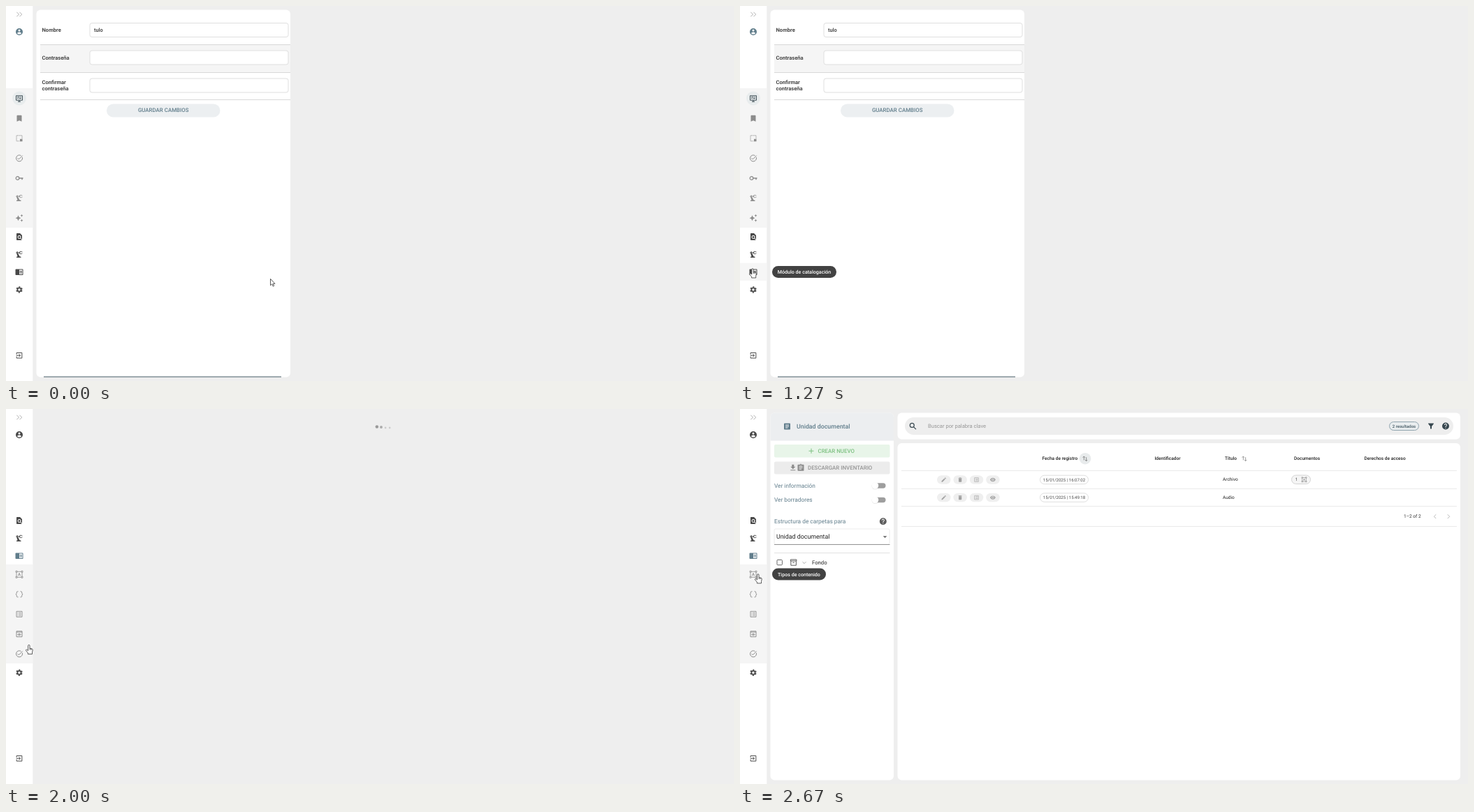
These frames come from a looping animation (1042x538 px, 5.2 s). An HTML page:

```html
<!DOCTYPE html>
<html lang="es">
<head>
<meta charset="utf-8">
<title>Panel</title>
<style>
html, body { margin: 0; width: 100%; height: 100%; overflow: hidden; background: #eee; }
svg { display: block; width: 100vw; height: 100vh; font-family: Roboto, sans-serif; text-rendering: geometricPrecision; }
</style>
</head>
<body>
<svg id="stage" viewBox="0 0 1042 538"></svg>
<script>
const DARK = '#484848', TEAL = '#607d8b', NAVY = '#37474f', GREY = '#8c8c8c';
const LOOP = 5200, TICK = 200 / 3;

// Icon parts on a 24 unit grid
const fill = d => `<path fill="currentColor" fill-rule="evenodd" d="${d}"/>`;
const line = (d, w = 2) => `<path fill="none" stroke="currentColor" stroke-width="${w}" d="${d}"/>`;
const ring = (x, y, r, w, extra = '') =>
  `<circle cx="${x}" cy="${y}" r="${r}" fill="none" stroke="currentColor" stroke-width="${w}" ${extra}/>`;

const ICONS = {
  user: fill('M12 2a10 10 0 1 0 0 20a10 10 0 1 0 0-20zm0 3a3 3 0 1 1 0 6a3 3 0 1 1 0-6zm0 14.2c-2.5 0-4.7-1.3-6-3.2c0-2 4-3.1 6-3.1s6 1.1 6 3.1c-1.3 1.9-3.5 3.2-6 3.2z'),
  more: line('M4 5l7 7-7 7M13 5l7 7-7 7', 1.7),
  screen: line('M3 4h18v13H3zM8 21h8M12 17v4M6 8h7M15 8h3M6 12h3M11 12h7', 1.9),
  bookmark: fill('M17 3H7c-1.1 0-2 .9-2 2v16l7-3 7 3V5c0-1.1-.9-2-2-2z'),
  select: '<path d="M20 13V4H4v16h9" fill="none" stroke="currentColor" stroke-width="1.6" stroke-dasharray="2.5 1"/>' +
    fill('M14 14h7v7h-7z'),
  task: line('M20.6 9.2A9 9 0 1 1 17 4.5M7 11.6l3.6 3.6L21.3 4.5'),
  key: ring(7, 12, 4.7, 2.4) + line('M11.5 12H23M20 12v4.5', 3),
  arm: fill('M19.9 8.35l-3.6 1.7L14 7.7V6.3l2.3-2.3 3.6 1.7c.9.3 1.5-.9.7-1.4l-4-1.8c-.4-.2-.8-.1-1.1.2L13.8 4.4C13.2 3.6 12 4 12 5v1H8.8A3 3 0 1 0 4.5 9.6L7.1 18H6c-1.1 0-2 .9-2 2v1h13v-1c0-1.1-.9-2-2-2h-1.6L8.4 8.8l.4-.8H12v1c0 1 1.2 1.4 1.8.6l1.7 1.7c.3.3.7.4 1.1.2l4-1.8c.8-.5.2-1.7-.7-1.35zM6 6a1 1 0 1 1 0 2a1 1 0 1 1 0-2z'),
  stars: fill('M19 9l1.25-2.75L23 5l-2.75-1.25L19 1l-1.25 2.75L15 5l2.75 1.25zM11.5 9.5L9 4 6.5 9.5 1 12l5.5 2.5L9 20l2.5-5.5L17 12zM19 15l-1.25 2.75L15 19l2.75 1.25L19 23l1.25-2.75L23 19l-2.75-1.25z'),
  find: fill('M20 19.6V8l-6-6H6c-1.1 0-2 .9-2 2v16c0 1.1.9 2 2 2h12l1.2-.4-4.4-4.4A5 5 0 1 1 16.2 15.8zM12 10a3 3 0 1 0 0 6a3 3 0 1 0 0-6z'),
  book: fill('M13 9.5h7V11h-7zm0 2.5h7v1.5h-7zm0 2.5h7V16h-7zM21 4H3c-1.1 0-2 .9-2 2v13c0 1.1.9 2 2 2h18c1.1 0 2-.9 2-2V6c0-1.1-.9-2-2-2zm0 15h-9V6h9z'),
  gear: ring(12, 12, 5.5, 3.8) + ring(12, 12, 8.4, 2.8, 'pathLength="12" stroke-dasharray="1 1" stroke-dashoffset="-.5"'),
  exit: line('M4 9V4h16v16H4v-5M3 12h12M10.8 7.7L15.1 12l-4.3 4.3'),
  frame: line('M6 4h12M6 20h12M4 6v12M20 6v12M2 2h4v4H2zM18 2h4v4h-4zM2 18h4v4H2zM18 18h4v4h-4zM8.5 16L12 8l3.5 8M10 13.5h4', 1.6),
  braces: line('M9 4H7Q4.5 4 4.5 7V9L2.5 12l2 3v2q0 3 2.5 3h2M15 4h2q2.5 0 2.5 3v2l2 3-2 3v2q0 3-2.5 3h-2'),
  list: line('M4 4h16v16H4zM7 8h2M11 8h6M7 12h2M11 12h6M7 16h2M11 16h6', 1.8),
  preview: line('M4 4h16v16H4zM4 6.5h16') + line('M7 13.5q5-6 10 0q-5 6-10 0z', 1.6) + fill('M10.5 12h3v3h-3z'),
  article: fill('M19 3H5c-1.1 0-2 .9-2 2v14c0 1.1.9 2 2 2h14c1.1 0 2-.9 2-2V5c0-1.1-.9-2-2-2zm-5 14H7v-2h7zm3-4H7v-2h10zm0-4H7V7h10z'),
  clip: fill('M19 3h-4.2a3 3 0 0 0-5.6 0H5c-1.1 0-2 .9-2 2v14c0 1.1.9 2 2 2h14c1.1 0 2-.9 2-2V5c0-1.1-.9-2-2-2zm-7 0a1 1 0 1 1 0 2a1 1 0 1 1 0-2zm2 14H7v-2h7zm3-4H7v-2h10zm0-4H7V7h10z'),
  download: fill('M19 9h-4V3H9v6H5l7 7zM5 18v2h14v-2z'),
  plus: line('M12 5v14M5 12h14'),
  help: fill('M12 2a10 10 0 1 0 0 20a10 10 0 1 0 0-20zm1 17h-2v-2h2zm2.07-7.75l-.9.9C13.45 12.9 13 13.5 13 15h-2v-.5c0-1.1.45-2.1 1.17-2.8l1.24-1.3A2 2 0 1 0 10 9H8a4 4 0 1 1 7.07 2.25z'),
  search: line('M14 14l6 6', 2.3) + ring(9.5, 9.5, 5.5, 2.2),
  filter: fill('M4.25 5.6L10 13v6c0 .55.45 1 1 1h2c.55 0 1-.45 1-1v-6l5.75-7.4c.5-.65 0-1.6-.8-1.6H5c-.8 0-1.25.95-.75 1.6z'),
  sort: line('M8 17V4M4 8l4-4 4 4M16 7v13M12 16l4 4 4-4', 1.7),
  edit: fill('M3 17.25V21h3.75L17.8 9.95 14.05 6.2zM20.7 7c.4-.4.4-1 0-1.4l-2.3-2.3c-.4-.4-1-.4-1.4 0l-1.85 1.8 3.75 3.75z'),
  trash: fill('M6 19c0 1.1.9 2 2 2h8c1.1 0 2-.9 2-2V7H6zM19 4h-3.5l-1-1h-5l-1 1H5v2h14z'),
  eye: fill('M12 4.5C7 4.5 2.7 7.6 1 12c1.7 4.4 6 7.5 11 7.5s9.3-3.1 11-7.5c-1.7-4.4-6-7.5-11-7.5zM12 7a5 5 0 1 1 0 10a5 5 0 1 1 0-10zm0 2a3 3 0 1 0 0 6a3 3 0 1 0 0-6z'),
  box: line('M3.5 4h17v4h-17zM4.5 8v12.5h15V8M9.5 12.5h5'),
  down: line('M5 9l7 7 7-7'),
  left: line('M15 5l-7 7 7 7'),
  right: line('M9 5l7 7-7 7'),
};

const icon = (name, x, y, color, size = 12) =>
  `<g color="${color}" transform="translate(${x} ${y}) scale(${size / 24}) translate(-12 -12)">${ICONS[name]}</g>`;
const rect = (x, y, w, h, color, rx = 0, stroke = 'none') =>
  `<rect x="${x}" y="${y}" width="${w}" height="${h}" rx="${rx}" fill="${color}" stroke="${stroke}"/>`;
const disc = (x, y, r, color, opacity = 1) =>
  `<circle cx="${x}" cy="${y}" r="${r}" fill="${color}" opacity="${opacity}"/>`;
const rule = (x1, x2, y, color = '#e2e2e2') => rect(x1, y, x2 - x1, 1, color);
const text = (s, x, y, size, color, weight = 400, anchor = 'start') =>
  `<text x="${x}" y="${y}" font-size="${size}" fill="${color}" font-weight="${weight}" text-anchor="${anchor}">${s}</text>`;
const group = (id, body) => `<g id="${id}">${body}</g>`;
const column = (names, y, step, color) =>
  names.map((n, i) => icon(n, 19, y + i * step, color)).join('');

function accountPage() {
  const field = y => rect(120, y + .5, 284, 20, '#fff', 3, '#dfdfdf');
  const label = (s, y) => text(s, 51.5, y, 7.6, DARK, 700);
  return rect(43.5, 5.5, 363.5, 527, '#fff', 6) +
    rect(49, 56, 358, 39, '#f5f5f5') +
    [55, 95, 134].map(y => rule(49, 407, y, '#d8d8d8')).join('') +
    [24, 63.5, 103.5].map(field).join('') +
    label('Nombre', 37) + label('Contraseña', 76.7) + label('Confirmar', 112) + label('contraseña', 121.2) +
    text('tulo', 126, 37, 7.4, '#333', 500) +
    rect(144, 140.5, 162.5, 19, '#eceff1', 9.5) +
    text('GUARDAR CAMBIOS', 225.2, 152.2, 7.9, TEAL, 500, 'middle') +
    rule(54, 394, 531.5, '#455a64');
}

function menuBefore() {
  return rect(0, 118, 38, 200, '#f5f5f5') + disc(19, 132.5, 10, '#e8eced') +
    icon('user', 19, 37, TEAL) + icon('screen', 19, 132.7, NAVY) +
    column(['bookmark', 'select', 'task', 'key', 'arm', 'stars'], 161.2, 28.6, GREY);
}

function menuAfter() {
  return rect(0, 223, 38, 142, '#f5f5f5') + icon('user', 19, 37, DARK) +
    column(['frame', 'braces', 'list', 'preview', 'task'], 237.3, 28.5, GREY);
}

// Entries that slide with the opened section
const mainMenu = (y, gearY, bookColor) =>
  column(['find', 'arm'], y, 25.4, DARK) + icon('book', 19, y + 50.5, bookColor) + icon('gear', 19, gearY, DARK, 11.5);

function catalogPage() {
  const toggle = y => rect(193, y - 3.7, 15.5, 7.4, '#9e9e9e', 3.7) +
    disc(193.5, y + .6, 5, '#000', .1) + disc(193.5, y, 4.8, '#fff');
  return rect(43.5, 5.5, 176.5, 527, '#fff', 6) +
    '<path d="M43.5 45.5V11.5a6 6 0 0 1 6-6H214a6 6 0 0 1 6 6V45.5z" fill="#eceef0"/>' +
    icon('article', 67.5, 25, TEAL) + text('Unidad documental', 81, 28.3, 8.8, TEAL, 500) +
    rect(49, 51, 165.5, 18.5, '#e8f5e9', 2) + icon('plus', 102, 60.2, '#7cc080') +
    text('CREAR NUEVO', 111.5, 62.8, 7.9, '#7cc080', 500) +
    rect(49, 75.5, 165.5, 18, '#ececec', 2) + icon('download', 75.8, 84.2, GREY) + icon('clip', 87, 84.2, GREY) +
    text('DESCARGAR INVENTARIO', 97, 87.2, 7.9, '#949494', 500) +
    text('Ver información', 49, 112.7, 8.3, TEAL) + text('Ver borradores', 49, 133.3, 8.3, TEAL) +
    toggle(110) + toggle(130.5) +
    text('Estructura de carpetas para', 49, 164, 8.35, TEAL) + icon('help', 204.8, 161.2, '#5c5c5c') +
    rect(49, 172, 165, 22, '#fff', 2, '#ececec') + rule(49, 214.5, 194, '#959595') +
    text('Unidad documental', 52, 186.3, 8.85, '#222') +
    '<path d="M204.7 182.2h5.6l-2.8 2.8z" fill="#666"/>' +
    rule(49, 214.5, 206) +
    rect(225.5, 5.5, 805.5, 38, '#fff', 6) + rect(236, 12, 785, 25, '#eee', 12.5) +
    icon('search', 247.6, 24.8, NAVY, 13) + text('Buscar por palabra clave', 269, 27.1, 7.6, '#979797') +
    icon('filter', 989, 24.5, NAVY) + icon('help', 1010, 24.5, NAVY) +
    rect(225.5, 49, 805.5, 483.5, '#fff', 6);
}

const countChip = (s, x, weight) => rect(x + .5, 18.5, 971 - x, 12, '#e9edef', 6, '#90a4ae') +
  text(s, (x + 972) / 2, 26.7, 6, '#455a64', weight, 'middle');

function results() {
  const heads = [['Fecha de registro', 432.5], ['Identificador', 593.5], ['Título', 694], ['Documentos', 793], ['Derechos de acceso', 893.5]];
  const actions = ['edit', 'trash', 'list', 'eye'];
  const row = (y, time, title) =>
    actions.map((n, i) => rect(282 + i * 23.4, y - 6, 19.5, 12.5, '#efefef', 6.2) + icon(n, 291.7 + i * 23.4, y + .3, '#a2a2a2', 8.5)).join('') +
    rect(429.5, y - 6, 69, 12.5, '#fff', 6.2, '#dedede') +
    text('15/01/2025 | ' + time, 464, y + 2.3, 6.1, DARK, 400, 'middle') +
    text(title, 691, y + 2.2, 6.5, '#222');
  return heads.map(([s, x]) => text(s, x, 73.2, 6.55, '#222', 500)).join('') +
    disc(494, 71.2, 8.3, '#e8ebec') + icon('sort', 494, 71.3, '#666', 10) + icon('sort', 722, 71.3, '#777', 10) +
    [88, 114, 139, 168].map(y => rule(231, 1026, y, '#eaeaea')).join('') +
    row(101.2, '16:07:02', 'Archivo') + row(126.8, '15:49:18', 'Audio') +
    rect(789.5, 95, 27, 12.5, '#f5f5f5', 6.2, '#d4d4d4') + text('1', 794.8, 103.4, 6.2, DARK) + icon('frame', 807.5, 101.3, '#808080', 8.5) +
    text('1–2 of 2', 950, 156.2, 6.55, '#333') + icon('left', 995, 154.2, '#aaa', 10) + icon('right', 1014, 154.2, '#aaa', 10) +
    rect(53, 216.4, 7.4, 7.4, '#fff', 1, '#666') + icon('box', 76.6, 220, '#5c5c5c') + icon('down', 92, 220.3, '#888', 8.5) +
    text('Fondo', 103, 222.8, 7.7, '#222') + countChip('2 resultados', 929, 500);
}

// label, width, top, first shown, faded in, hidden
const TIPS = [
  ['Módulo de catalogación', 92, 373, 1133, 1266, 1730],
  ['Administración del sistema', 102, 369.7, 1700, 1800, 1990],
  ['Tipos de contenido', 77, 228.5, 2466, 2666, LOOP],
];
// time, x, y of the pointer
const PATH = [
  [0, 378.5, 391.5], [133, 382.5, 391.5], [533, 382.5, 391.5], [600, 369.5, 391.5], [667, 345, 391], [933, 140, 380],
  [1067, 62.5, 374], [1133, 24, 377], [1200, 18, 377], [1800, 18, 377], [1933, 22, 366], [2133, 54, 285],
  [2200, 56, 262], [2267, 51.4, 246], [2333, 38.3, 238.7], [2400, 30, 237], [2667, 25.8, 237],
];

const stage = document.getElementById('stage');
stage.innerHTML =
  '<clipPath id="rowA"><path d="M0 369h38v25H0z"/></clipPath><clipPath id="rowB"><path d="M0 198h38v25H0z"/></clipPath>' +
  rect(0, 0, 1042, 538, '#eee') + rect(0, 0, 38.3, 538, '#fff') +
  icon('more', 19, 12, '#9a9a9a', 11) + icon('exit', 19, 501.3, DARK, 11.5) +
  group('before', accountPage() + menuBefore()) + group('after', menuAfter()) +
  group('hover', rect(0, 0, 38, 25.3, '#f6f6f6')) +
  '<g id="clip"><circle id="ripple" cx="17" fill="#000"/></g>' +
  group('mainA', mainMenu(331, 407, DARK)) + group('mainB', mainMenu(160, 378.2, TEAL)) +
  group('catalog', catalogPage()) + group('empty', countChip('No hay resultados', 914, 700)) + group('results', results()) +
  group('dots', '') +
  TIPS.map(([s, w, y], i) => group('tip' + i, rect(46, y, w, 17, '#424242', 8.5) + text(s, 46 + w / 2, y + 11, 7.1, '#fff', 500, 'middle'))).join('') +
  group('arrow', '<path d="M0 0V9.3L2.2 7.4 3.7 10.7 5.2 10 3.7 6.9H6.5Z" fill="#fff" stroke="#333" stroke-width=".8"/>') +
  group('hand', '<path d="M-1.2 1A1.2 1.2 0 0 1 1.2 1V4.7L4.3 5.3Q5.5 5.7 5.4 7.2L4.7 10.3V13H-1.4V11.3L-4.2 8Q-4.7 6.7-3.4 6.4L-1.2 8ZM1.3 4.8V7M3.2 5.2V7.2" fill="#fff" stroke="#333" stroke-width=".8"/>');

const el = id => document.getElementById(id);
const show = (id, on) => el(id).setAttribute('display', on ? 'inline' : 'none');
const clamp = v => Math.max(0, Math.min(1, v));

function pointer(t) {
  const i = PATH.findIndex(p => p[0] > t);
  if (i < 0) return PATH[PATH.length - 1].slice(1);
  const [a, b] = [PATH[i - 1], PATH[i]], k = (t - a[0]) / (b[0] - a[0]);
  return [1, 2].map(n => a[n] + (b[n] - a[n]) * k);
}

// Four dots swelling one after another
function dots(x, y, age) {
  return [0, 1, 2, 3].map(i => {
    const local = age - i * 150, s = local > 0 ? Math.sin(local / 840 * 2 * Math.PI) : 0;
    return disc(x + i * 6.1, y - 1.4 * s, 1.35 + .95 * s, '#000', .14 + .22 * s);
  }).join('');
}

function draw(now) {
  // The screen refreshes on a fixed 15 Hz grid
  const t = Math.floor((now % LOOP + 3.5) / TICK) * TICK + .5;
  const moved = t > 1730, catalog = t > 2330, done = t > 2465;
  show('before', !moved); show('mainA', !moved);
  show('after', moved); show('mainB', moved);
  show('catalog', catalog); show('empty', catalog && !done); show('results', done);

  el('dots').innerHTML = !moved || done ? '' :
    catalog ? dots(123, 239.5, t - 2293) + dots(619.2, 291.2, t - 2293) : dots(530.9, 26.9, t - 1760);

  show('hover', t > 1130 && t < 1960);
  el('hover').setAttribute('transform', `translate(0 ${moved ? 365 : 368.7})`);

  const ripple = el('ripple');
  show('clip', t > 1665 && t < 2000);
  el('clip').setAttribute('clip-path', moved ? 'url(#rowB)' : 'url(#rowA)');
  ripple.setAttribute('cy', moved ? 205.5 : 377);
  ripple.setAttribute('r', 11.5 * clamp((t - 1600) / 200) + 8 * clamp((t - 1800) / 200));
  ripple.setAttribute('opacity', .18 * clamp((2000 - t) / 200));

  TIPS.forEach(([, , , from, full, to], i) => {
    show('tip' + i, t > from && t < to);
    el('tip' + i).setAttribute('opacity', clamp((t - from) / (full - from)));
  });

  const [x, y] = pointer(t), hand = x < 38;
  show('hand', hand); show('arrow', !hand);
  el(hand ? 'hand' : 'arrow').setAttribute('transform', `translate(${x} ${y})`);
}

const start = performance.now();
function loop() {
  draw(performance.now() - start);
  requestAnimationFrame(loop);
}
loop();
</script>
</body>
</html>
```
